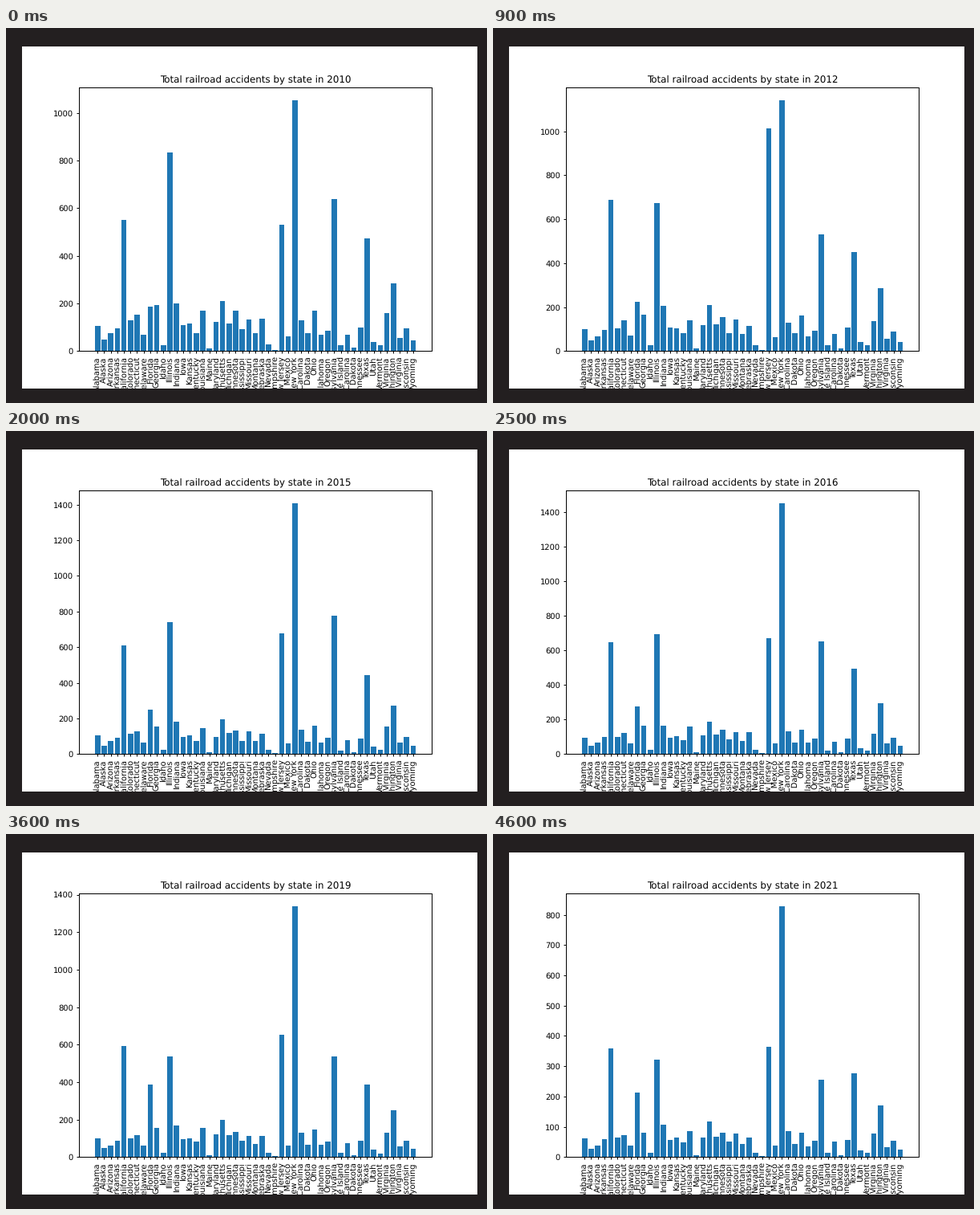
A matplotlib script that plays this animation: 600 px wide and 467 px high, repeating every 4.7 s.

```python
import matplotlib.pyplot as plt
import numpy as np
from matplotlib.animation import FuncAnimation
from matplotlib.patches import Rectangle

W, H, DPI = 600, 467, 72
DARK = "#231f20"
LEFT, TOP, SCALE = 20, 23.3, 0.986        # white sheet: 8 x 6 in at 72 dpi, scaled
SHEET_W, SHEET_H = 576 * SCALE, 432 * SCALE
HOLD, FRAMES = 4, 47                      # frames per year, frames per loop

# Typical yearly count per state; busy states follow their own path below
STATES = """Alabama 107, Alaska 48, Arizona 71, Arkansas 97, California, Colorado 113,
Connecticut 129, Delaware 68, Florida, Georgia 167, Hawaii 1, Idaho 25, Illinois,
Indiana 179, Iowa 102, Kansas 107, Kentucky 83, Louisiana 160, Maine 12, Maryland 115,
Massachusetts 205, Michigan 115, Minnesota 147, Mississippi 85, Missouri 135,
Montana 73, Nebraska 124, Nevada 25, New Hampshire 5, New Jersey, New Mexico 64,
New York, North Carolina 131, North Dakota 75, Ohio 159, Oklahoma 67, Oregon 89,
Pennsylvania, Rhode Island 24, South Carolina 77, South Dakota 14, Tennessee 95,
Texas 475, Utah 38, Vermont 24, Virginia 139, Washington 280, West Virginia 59,
Wisconsin 95, Wyoming 44"""

KEY_YEARS = [2010, 2012, 2014, 2015, 2017, 2019, 2021]
PATHS = {
    "California": [552, 690, 592, 608, 692, 592, 359],
    "Florida": [186, 225, 252, 249, 303, 386, 213],
    "Illinois": [833, 673, 764, 741, 649, 538, 321],
    "New Jersey": [530, 1014, 729, 677, 669, 652, 364],
    "New York": [1053, 1141, 1376, 1407, 1498, 1338, 828],
    "Pennsylvania": [638, 530, 521, 777, 533, 539, 255],
}


def yearly_counts(year):
    """Small states share one slow trend with a little seeded noise."""
    rng = np.random.default_rng(year)
    trend = np.interp(year, [2010, 2019, 2021], [1.03, 0.95, 0.58])
    counts = {}
    for entry in STATES.replace("\n", " ").split(","):
        name = entry.strip(" 0123456789")
        if name in PATHS:
            counts[name] = np.interp(year, KEY_YEARS, PATHS[name])
        else:
            counts[name] = int(entry.split()[-1]) * trend * rng.normal(1, 0.06)
    if year != 2014:                      # Hawaii reported in one year only
        del counts["Hawaii"]
    return counts


plt.rcParams.update({
    "font.family": "DejaVu Sans",
    "text.hinting": "none",
    "axes.linewidth": 1,
    "axes.titlesize": 12 * SCALE,
    "axes.titlepad": 7,
})
for axis in "xy":
    plt.rcParams.update({
        f"{axis}tick.major.width": 1,
        f"{axis}tick.major.size": 3.5 * SCALE,
        f"{axis}tick.major.pad": 3.5 * SCALE,
        f"{axis}tick.labelsize": 10 * SCALE,
    })

fig = plt.figure(figsize=(W / DPI, H / DPI), dpi=DPI, facecolor=DARK)
bottom = H - TOP - SHEET_H


def box(x, y, w, h, color, z):
    fig.add_artist(Rectangle((x / W, y / H), w / W, h / H, transform=fig.transFigure,
                             facecolor=color, edgecolor="none", zorder=z))


box(LEFT, bottom, SHEET_W, SHEET_H, "white", -1)
box(0, 0, W, bottom, DARK, 10)            # cuts off the long state labels
ax = fig.add_axes([(LEFT + 0.125 * SHEET_W) / W, (bottom + 0.11 * SHEET_H) / H,
                   0.775 * SHEET_W / W, 0.77 * SHEET_H / H])


def draw(i):
    year = 2010 + i // HOLD
    counts = yearly_counts(year)
    slots = range(len(counts))
    ax.clear()
    ax.bar(slots, list(counts.values()), color="#1f77b4")
    ax.set_xticks(slots, list(counts), rotation=90)
    ax.set_title(f"Total railroad accidents by state in {year}")
    return []


anim = FuncAnimation(fig, draw, frames=FRAMES, init_func=lambda: [],
                     interval=100, repeat=True, repeat_delay=0)
plt.show()
```
